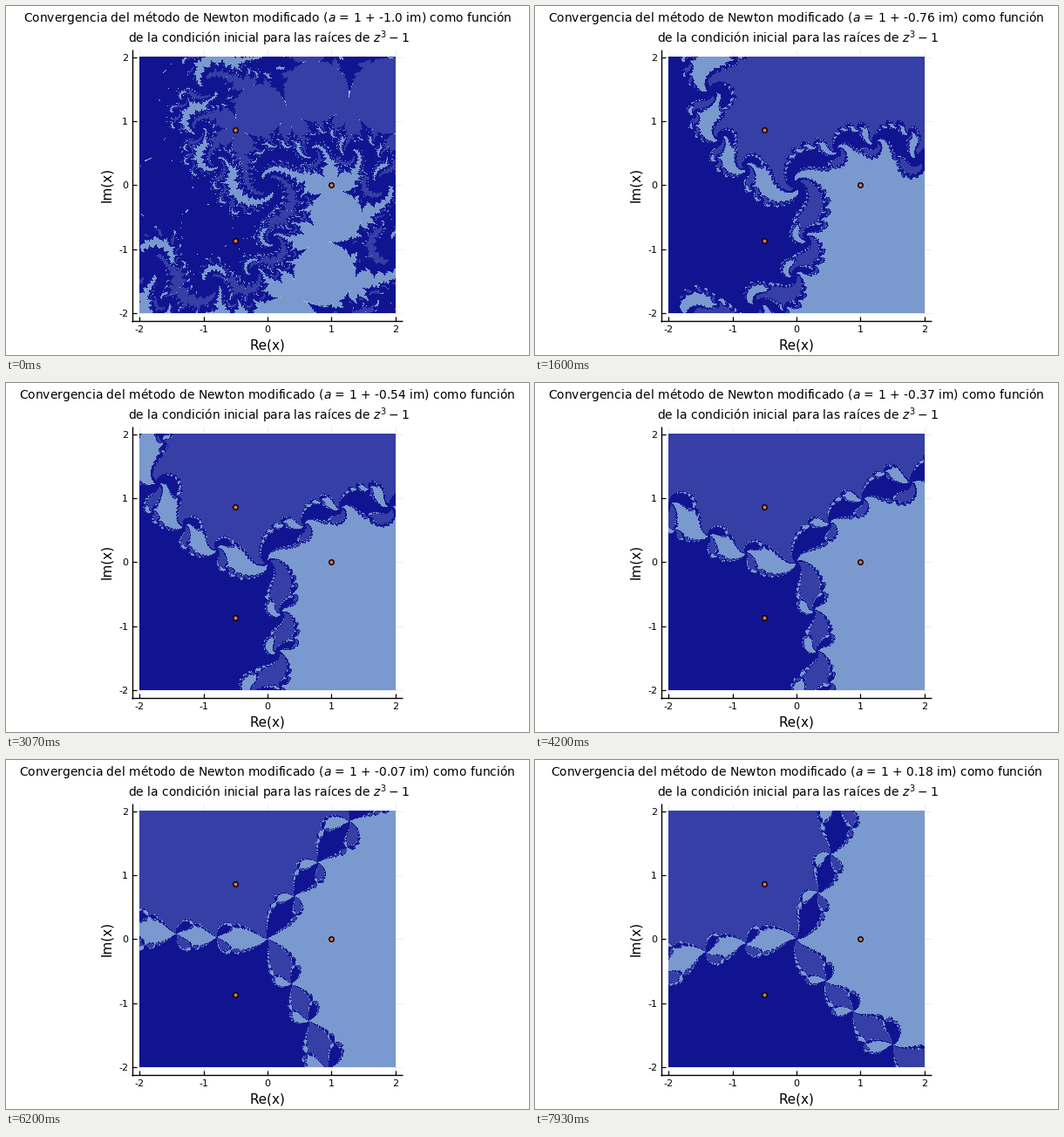
These frames come from a looping animation (600 px wide and 400 px high, 8000 ms). A matplotlib script:

```python
import numpy as np
import matplotlib.pyplot as plt
from matplotlib.animation import FuncAnimation

plt.rcParams["font.family"] = "DejaVu Sans"
plt.rcParams["mathtext.fontset"] = "dejavusans"
plt.rcParams["text.kerning_factor"] = 6

W, H, DPI = 600, 400, 100
FRAMES, LOOP_MS = 120, 8000
CX, CY, UNIT = 300, 205.3, 73.3          # plot centre and pixels per unit
LEFT, RIGHT, TOP, BOTTOM = 153, 447, 58, 352

# An orbit must be with its root by step SETTLE and stay there up to STEPS.
SETTLE, LATE, STEPS = 10, 40, 100

ROOTS = np.exp(2j * np.pi / 3 * np.arange(3))
# basin of 1, of the upper root, of the lower root or unsettled, late leavers
PALETTE = np.array([(122, 153, 206), (53, 63, 165), (17, 20, 145),
                    (160, 200, 228)], dtype=np.uint8)
DARK, PALE = 2, 3

px = np.arange(LEFT, RIGHT) + 0.5
py = np.arange(TOP, BOTTOM) + 0.5
START = ((px[None, :] - CX) - 1j * (py[:, None] - CY)) / UNIT
START = START.astype(np.complex64)


def relaxed(z, a):
    """One step z - a f / f' for f = z^3 - 1."""
    return (1 - a / 3) * z + (a / 3) / (z * z)


def nearest(z):
    """Index of the root closest to z."""
    return np.where(np.sqrt(3) * z.real > np.abs(z.imag), 0,
                    np.where(z.imag > 0, 1, 2))


def basins(b):
    a = complex(1, b)
    z = START.ravel()
    with np.errstate(all="ignore"):
        for _ in range(SETTLE):
            z = relaxed(z, a)
        label = nearest(z)
        active = np.arange(z.size)
        for step in range(SETTLE, STEPS):
            keep = np.abs(z * z * z - 1) > 0.03
            z, active = relaxed(z[keep], a), active[keep]
            stays = nearest(z) == label[active]
            label[active[~stays]] = DARK if step < LATE else PALE
            z, active = z[stays], active[stays]
    return PALETTE[label.reshape(START.shape)]


fig = plt.figure(figsize=(W / DPI, H / DPI), dpi=DPI, facecolor="white")
ax = fig.add_axes([0, 0, 1, 1])
image = ax.imshow(np.zeros(START.shape + (3,), np.uint8), origin="upper",
                  extent=(LEFT, RIGHT, BOTTOM, TOP), aspect="auto",
                  interpolation="nearest", zorder=1)
ax.set_xlim(0, W)
ax.set_ylim(H, 0)
ax.axis("off")

X0, X1, Y0, Y1 = 145, 455, 50, 361


def line(xs, ys, width=1.0, **style):
    ax.plot(xs, ys, color="black", lw=width, solid_capstyle="butt", **style)


for v in range(-2, 3):
    x, y = CX + v * UNIT, CY - v * UNIT
    line([x, x], [Y0, Y1], 0.5, alpha=0.1, zorder=0)
    line([X0, X1], [y, y], 0.5, alpha=0.1, zorder=0)
    line([x, x], [Y1, Y1 - 4.9], 0.9, zorder=3)
    line([X0, X0 + 4.9], [y, y], 0.9, zorder=3)
    ax.text(x, 370.5, str(v), fontsize=8, ha="center", va="center")
    ax.text(140.1, y, str(v), fontsize=8, ha="right", va="center_baseline")
line([X0, X0], [Y0, Y1 + 0.7], zorder=3)
line([X0 - 0.7, X1], [Y1, Y1], zorder=3)

ax.plot(CX + ROOTS.real * UNIT, CY - ROOTS.imag * UNIT, "o", ms=4,
        mfc="#E26F46", mec="black", mew=1, zorder=4)

ax.text(300, 393, "Re(x)", fontsize=11, ha="center", va="baseline")
ax.text(123.5, 205.3, "Im(x)", fontsize=11, rotation=90,
        rotation_mode="anchor", ha="center", va="bottom")
title = ax.text(300, 18, "", fontsize=10, ha="center", va="baseline")
ax.text(140.4, 42, "de la condición inicial para las raíces de $z^3 - 1$",
        fontsize=10, ha="left", va="baseline")


def draw(k):
    b = (k - 100) / 100
    image.set_data(basins(b))
    title.set_text("Convergencia del método de Newton modificado "
                   f"($a$ = 1 + {b} im) como función")
    return image, title


anim = FuncAnimation(fig, draw, frames=FRAMES, interval=LOOP_MS / FRAMES,
                     repeat=True, repeat_delay=0, blit=False)
plt.show()
```
